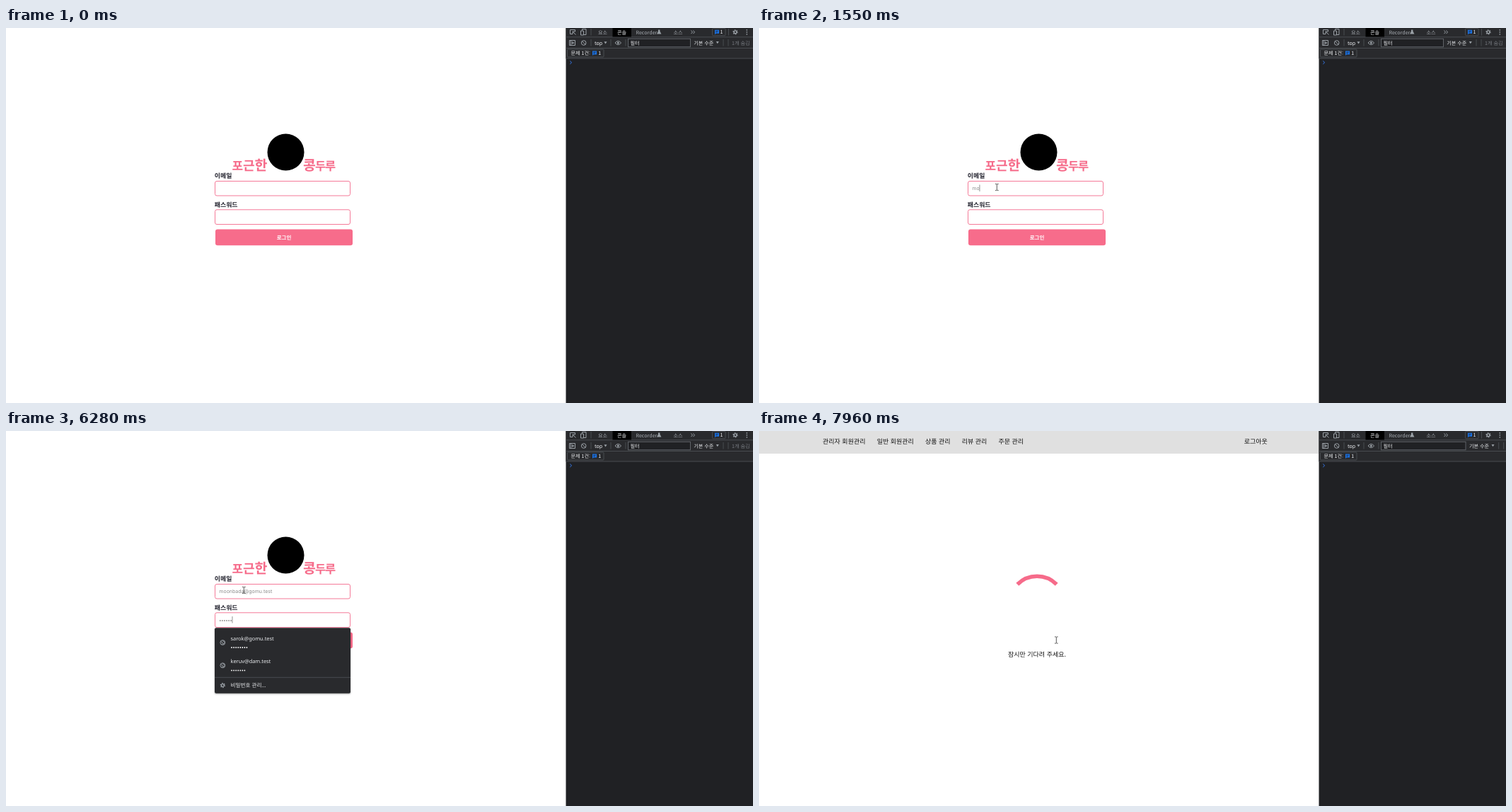
Write an HTML page that moves like this. It is 1056x530 px and loops after 8 s.

```html
<!DOCTYPE html>
<html lang="ko">
<head>
<meta charset="utf-8">
<title>Login</title>
<style>
  html, body { margin: 0; width: 100%; height: 100%; overflow: hidden; background: #fff; }
  svg { display: block; width: 1056px; height: 530px; }
  text { font-family: "Noto Sans CJK KR", "Noto Sans CJK", "Noto Sans", sans-serif; white-space: pre; text-rendering: geometricPrecision; }
  .brand { font-weight: 900; fill: #f66b8a; }
  .label { font-size: 8.9px; font-weight: 700; fill: #20202c; }
  .field { fill: #fff; stroke: #f47a98; }
  .typed { font: 7px Inter, sans-serif; fill: #8c8c8c; }
  .dots { fill: none; stroke: #fff; stroke-width: 1.8; stroke-linecap: round; stroke-dasharray: 0 3.06; }
  .nav text, .wait { font-size: 9px; fill: #111; }
  .popup { transform-box: view-box; transform-origin: 391px 324.5px; filter: drop-shadow(0 1px 1px #0005); }
  .popup text { font-family: "Noto Sans", "Noto Sans CJK KR", sans-serif; font-size: 7.4px; fill: #e8eaed; }
  .line { fill: none; stroke: #9aa0a6; stroke-width: 1; }
  .rule { fill: none; stroke: #494c50; stroke-width: 1; }
  .tools text { font-size: 7.1px; fill: #a4a9af; }
  .tools .lit { fill: #e8eaed; }
  .tools .dim { fill: #777b80; }
</style>
</head>
<body>
<svg viewBox="0 0 1056 530">
  <defs>
    <g id="globe">
      <circle r="3.4" class="line" stroke-width=".9"/>
      <path d="M-2.8-1.5L-.5-.3L-.2 1.4L-1 3M.2-3.2L1-1.5L3-.8M1 3L1.4 1L3 .8" class="line"/>
    </g>
    <g id="gear">
      <circle r="2.9" fill="none" stroke="#9aa0a6" stroke-width="1.5" stroke-dasharray="1.5 1.537"/>
      <circle r="1.9" fill="none" stroke="#9aa0a6" stroke-width="1.4"/>
    </g>
    <g id="bubble">
      <path d="M0 0h6v5h-4.4l-1.6 1.6z" fill="#1a73e8"/>
      <path d="M1.2 1.7h3.6M1.2 3.3h2.6" stroke="#202124" stroke-width=".7"/>
    </g>
    <path id="down" d="M-2-1.5h4l-2 3.2z" fill="#9aa0a6"/>
  </defs>

  <rect width="1056" height="530" fill="#fff"/>

  <g id="login">
    <circle cx="395.5" cy="175.5" r="26"/>
    <g class="brand">
      <text x="319.5" y="201" font-size="17">포</text>
      <text x="335" y="201" font-size="18">근</text>
      <text x="351.5" y="201" font-size="19.5">한</text>
      <text x="420" y="201" font-size="19.5">콩</text>
      <text x="437" y="201" font-size="16.5">두</text>
      <text x="451" y="201" font-size="16.5">루</text>
    </g>
    <text class="label" x="294.8" y="212.4">이메일</text>
    <rect class="field" x="295.5" y="216.5" width="191" height="20.5" rx="2.5"/>
    <text class="label" x="294.8" y="253">패스워드</text>
    <rect class="field" x="295.5" y="256.8" width="191" height="20.7" rx="2.5"/>
    <rect x="296" y="284.5" width="194" height="22.8" rx="3" fill="#f76c8b"/>
    <text x="393" y="298.9" font-size="7.5" font-weight="700" fill="#fff" text-anchor="middle">로그인</text>
    <text class="typed" id="email" x="301.3" y="229.3"></text>
    <path class="dots" id="secret" style="stroke:#8c8c8c"/>
    <path id="caret" stroke="#777" stroke-width=".8"/>
    <g class="popup" id="popup">
      <rect x="295" y="278.3" width="192" height="92.5" rx="2" fill="#292a2d"/>
      <use href="#globe" x="306.3" y="299"/>
      <text x="317.5" y="295.6">sarok@gomu.test</text>
      <path class="dots" d="M319 306h21.5"/>
      <use href="#globe" x="306.3" y="331.3"/>
      <text x="317.5" y="328">keruv@dam.test</text>
      <path class="dots" d="M319 338.4h18.45"/>
      <path class="rule" d="M295 348.3h192" stroke-width=".8"/>
      <use href="#gear" x="306.3" y="359.5"/>
      <text x="317.5" y="362.2" style="font-size:7.6px">비밀번호 관리...</text>
    </g>
  </g>

  <g id="loading">
    <g class="nav" id="nav">
      <rect width="791" height="32" fill="#e0e0e0"/>
      <text x="90" y="18.4">관리자 회원관리</text>
      <text x="166.7" y="18.4">일반 회원관리</text>
      <text x="235" y="18.4">상품 관리</text>
      <text x="286.7" y="18.4">리뷰 관리</text>
      <text x="338.5" y="18.4">주문 관리</text>
      <text x="685.7" y="18.4">로그아웃</text>
    </g>
    <g id="wait">
      <path id="spinner" d="M365.3 216.8A39 39 0 0 1 420.7 216.8" fill="none" stroke="#f66b8a" stroke-width="5.5"/>
      <text class="wait" x="393" y="319.2" text-anchor="middle">잠시만 기다려 주세요.</text>
    </g>
  </g>

  <g class="tools">
    <rect x="791.5" width="264.5" height="530" fill="#202124"/>
    <rect x="791.5" width="264.5" height="43" fill="#292a2d"/>
    <path class="rule" d="M791.5 12.8H1056M791.5 28.5H1056M791.5 43H1056M827 1v9.500M827 16v9.500M855 16v9.500M876 16v9.500M1021.500 1v9.500" stroke-width=".8"/>
    <rect x="857.5" width="26.500" height="12.500" fill="#000"/>

    <path class="line" d="M801 8.500h-3.500v-6h7v2.500M801 5l4.500 4.500M801 5v3.500M801 5h3.500M814.500 3.500v-2h5.500v8h-3M812.500 4h4v6h-4z" stroke-width=".9"/>
    <text x="837" y="8.500">요소</text>
    <text class="lit" x="864" y="8.500">콘솔</text>
    <text x="890.500" y="8.500">Recorder</text>
    <path d="M922 2.500h2.400v2l2 4h-6.400l2-4z" fill="#9aa0a6"/>
    <text x="943.500" y="8.500">소스</text>
    <path class="line" d="M968.500 3.500l2 2.300l-2 2.300M971.500 3.500l2 2.300l-2 2.300"/>
    <rect class="rule" x="998.500" y=".5" width="18.500" height="10.300" rx="1"/>
    <use href="#bubble" x="1002" y="2.700"/>
    <text class="lit" x="1009.500" y="8.300">1</text>
    <use href="#gear" x="1031" y="5.800"/>
    <path d="M1047.300 2.800h.01m0 3h.01m0 3h.01" stroke="#9aa0a6" stroke-width="1.700" stroke-linecap="round"/>

    <path class="line" d="M796.500 17.500h8v7h-8zM798.500 17.500v7M800.500 19.500l2.500 1.500l-2.500 1.500z"/>
    <circle class="line" cx="816.700" cy="21" r="3.300"/>
    <path class="line" d="M814.400 18.700l4.600 4.600"/>
    <text x="832" y="23.600" class="lit">top</text>
    <use href="#down" x="847.500" y="20.800"/>
    <path class="line" d="M861 21q4.300-5.200 8.600 0q-4.300 5.200-8.600 0z"/>
    <circle cx="865.300" cy="21" r="1.500" fill="#9aa0a6"/>
    <rect id="filter" x="879.500" y="15.300" height="11.400" fill="#202124" stroke="#5f6368"/>
    <text class="lit" x="882.500" y="23.600">필터</text>
    <g id="levels">
      <text class="lit" x="972.300" y="23.500">기본 수준</text>
      <use href="#down" x="1005.800" y="20.500"/>
      <path class="rule" d="M1014 16v9.500M1021 16v9.500" stroke-width=".8"/>
    </g>
    <text class="dim" id="hidden" x="1026" y="23.500">1개 숨김</text>

    <rect class="rule" x="793.500" y="30" width="51.500" height="11" rx="1"/>
    <text class="lit" x="798.500" y="38.200">문제 1건:</text>
    <use href="#bubble" x="829" y="32.500"/>
    <text class="lit" x="837.200" y="38.200">1</text>
    <path d="M797.300 46.600l2.300 2.200l-2.300 2.200" fill="none" stroke="#367cf1" stroke-width="1"/>
  </g>

  <g id="cursor">
    <path id="beam" d="M-2.300-4.600h1.600l.7.600l.7-.6h1.600M0-4v8M-2.300 4.600h1.600l.7-.6l.7.600h1.600" fill="none" stroke="#444" stroke-width=".9"/>
    <path id="arrow" d="M0 0v9.500l2.200-2l1.500 3.300l1.400-.7l-1.500-3.100h3.100z" fill="#fff" stroke="#222" stroke-width=".6"/>
  </g>
</svg>
<script>
  const $ = id => document.getElementById(id);
  const show = (id, on) => { $(id).style.display = on ? '' : 'none'; };
  const place = (id, x, y) => $(id).setAttribute('transform', `translate(${x} ${y})`);
  const passed = (times, t) => times.filter(at => at <= t).length;
  // Last row whose time has been reached.
  const latest = (rows, t) => rows.filter(row => row[0] <= t).pop();

  const ADDRESS = 'moonbada@gomu.test';
  const emailKeys = [1320, 1550, 1710, 1940, 2100, 2100, 2340, 2580, 3050,
    3290, 3520, 3600, 3690, 3850, 4010, 4170, 4250, 4320];
  const secretKeys = [5260, 5340, 5500, 5800, 5890, 6280, 6520];

  // time, x, y, shape
  const pointer = [
    [0, -50, 0, 'arrow'],
    [130, 976, 488, 'arrow'], [210, 905, 458, 'arrow'], [290, 765, 400, 'arrow'],
    [370, 605, 335, 'arrow'], [450, 450, 268, 'beam'], [530, 365, 234, 'beam'],
    [610, 336.3, 225, 'beam'],
    [6840, 350, 219, 'beam'], [6920, 395, 203, 'arrow'], [7000, 452, 182, 'arrow'],
    [7080, 496, 163, 'arrow'], [7160, 511, 156, 'arrow'],
    [7320, 453.3, 258.500, 'beam'], [7400, 432, 284, 'beam'], [7480, 420.300, 295.500, 'beam']
  ];

  // time, opacity, scale, vertical shift
  const popup = [
    [0, 0, 1, 0], [690, 1, 1, -40.3], [1320, .8, .99, -40.3], [1390, .45, .975, -40.3],
    [1470, .15, .96, -40.3], [1550, 0, 1, 0],
    [4550, 1, 1, 0], [7240, .65, .98, 0], [7320, .2, .96, 0], [7400, 0, 1, 0]
  ];

  const caret = [[0, 0], [690, 1], [1160, 0], [1320, 1], [5100, 0], [5260, 1], [7080, 0]];
  const LOADING = 7720, READY = 7960;

  function drawLogin(t) {
    const text = ADDRESS.slice(0, passed(emailKeys, t));
    if ($('email').textContent !== text) $('email').textContent = text;

    const count = passed(secretKeys, t);
    $('secret').setAttribute('d', count ? `M302.800 268h${(count - 1) * 3.06 + .05}` : '');

    const inSecret = t >= 4550;
    const x = 301.600 + (inSecret ? count * 3.06 : text ? $('email').getComputedTextLength() : 0);
    $('caret').setAttribute('d', `M${x} ${inSecret ? 262 : 221.500}v9.500`);
    show('caret', latest(caret, t)[1]);

    const [, opacity, scale, shift] = latest(popup, t);
    show('popup', opacity);
    $('popup').style.opacity = opacity;
    $('popup').style.transform = `translateY(${shift}px) scale(${scale})`;
  }

  function drawLoading(t) {
    const ready = t >= READY;
    const turn = ready ? 0 : Math.floor((t - LOADING) / 80) * 28.800;
    show('nav', ready);
    place('wait', 0, ready ? 0 : -66.500);
    $('spinner').setAttribute('transform', `rotate(${turn} 393 244.300)`);
  }

  function frame() {
    const t = performance.now() % 8000;
    const loading = t >= LOADING;
    show('login', !loading);
    show('loading', loading);
    show('hidden', !loading);
    $('filter').setAttribute('width', loading ? 119.500 : 88);
    place('levels', loading ? 31.700 : 0, 0);
    if (loading) drawLoading(t);
    else drawLogin(t);

    const [, x, y, shape] = latest(pointer, t);
    place('cursor', x, y);
    show('beam', shape === 'beam');
    show('arrow', shape === 'arrow');
    requestAnimationFrame(frame);
  }
  frame();
</script>
</body>
</html>
```
